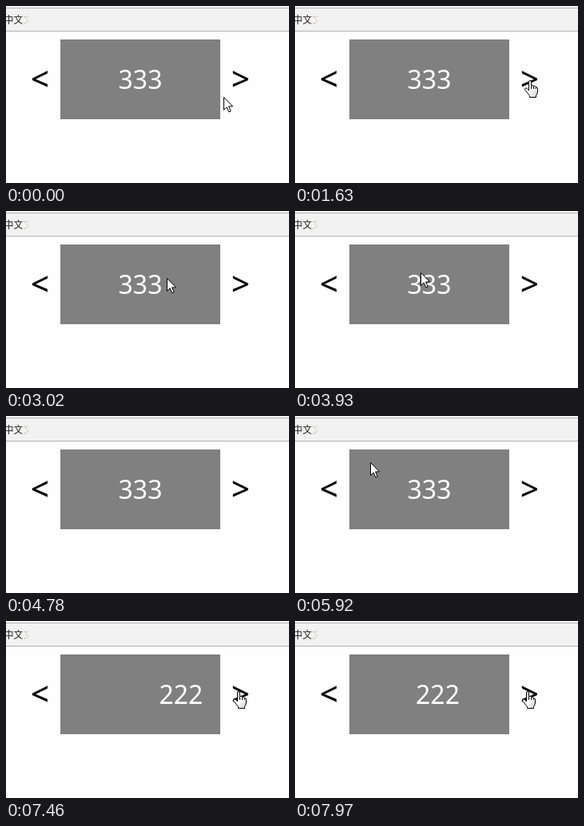
An HTML page for the animation above (8 s loop, 354 by 222 pixels).

```html
<!DOCTYPE html>
<html lang="en">
<head>
<meta charset="utf-8">
<title>Carousel</title>
<style>
  html, body { margin: 0; width: 100%; height: 100%; overflow: hidden; background: #fefefe; }
  svg { display: block; }
  .tab { font: 12px "Noto Sans CJK SC", "Noto Sans CJK", "Noto Sans", sans-serif; }
  .slide { font: 32px "Noto Sans", "Open Sans", sans-serif; fill: #fff; text-anchor: middle; }
  .nav { font: 40px "Open Sans", "Noto Sans", sans-serif; text-anchor: middle; stroke: #000; stroke-width: .4; }
  .cursor { fill: #fff; stroke: #000; stroke-linejoin: round; }
</style>
</head>
<body>
<svg width="354" height="222" viewBox="0 0 354 222">
  <defs>
    <linearGradient id="fade" gradientUnits="userSpaceOnUse" x1="19" x2="30">
      <stop stop-color="#222"/>
      <stop offset=".2" stop-color="#b5ad98"/>
      <stop offset="1" stop-color="#b5ad98" stop-opacity="0"/>
    </linearGradient>
    <linearGradient id="skin" x2="1" y2="1">
      <stop offset=".5" stop-color="#fff"/>
      <stop offset="1" stop-color="#ccc"/>
    </linearGradient>
    <clipPath id="view"><rect x="68" y="42" width="200" height="100"/></clipPath>
  </defs>

  <rect y="2" width="354" height="30" fill="#f2f2f2"/>
  <path d="M0 2.5H354M0 31.5H354" stroke="#b0b0b0"/>
  <text class="tab" x="-2.5" y="22" fill="url(#fade)">中文文</text>

  <rect x="68" y="42" width="200" height="100" fill="#808080"/>
  <g clip-path="url(#view)">
    <g id="strip" class="slide">
      <text x="168" y="104">111</text>
      <text x="368" y="104">222</text>
      <text x="568" y="104">333</text>
    </g>
  </g>

  <text class="nav" x="42.5" y="105.5">&lt;</text>
  <text class="nav" x="293.5" y="105.5">&gt;</text>

  <path id="arrow" class="cursor" d="M.5 .5v16l3.7-3.6 2.6 6 2.4-1-2.6-6h5z"/>
  <g id="hand" class="cursor">
    <path fill="url(#skin)" d="M5.5 13V2Q5.5 .5 7 .5T8.5 2V6.5Q11.5 5.7 11.5 7.5Q14 6.8 14.2 8.7Q16.5 8.3 16.5 10.8V14Q16.5 17 14.5 19.5V21.5H6.5V19.5L1 12.5Q0 11 1 10.2T3.5 10.7Z"/>
    <path d="M8.5 7v4M11.5 8v3M14.2 9v2" fill="none"/>
  </g>
</svg>
<script>
const LOOP = 8000, TICK = 129, WIDTH = 200;
const SLIDE = { shown: 6680, start: 6589, length: 1930 };
const AWAY = { from: 4780, to: 5770 };

// Pointer strokes: Bézier curves, one step along per tick
const strokes = [
  { at: 150, steps: 3, x: [272, 277, 284, 287], y: [114, 106, 96, 90] },
  { at: 1630, steps: 4, x: [287, 286, 289, 292], y: [90, 95, 96, 93] },
  { at: 2330, steps: 8, x: [292, 70, 152, 290], y: [93, 61, 82, 93] },
  { at: 3480, steps: 8, x: [290, 230, 80, 36], y: [93, 72, 74, 88] },
  { at: 5770, steps: 6, x: [36, -22, 370, 284], y: [88, 43, 43, 88] }
];

const [strip, arrow, hand] = ["strip", "arrow", "hand"].map(id => document.getElementById(id));

const bezier = ([a, b, c, d], p) => {
  const q = 1 - p;
  return q * q * q * a + 3 * q * q * p * b + 3 * q * p * p * c + p * p * p * d;
};

// Same curve as the CSS "ease" timing function
function ease(x) {
  let lo = 0, hi = 1;
  for (let i = 0; i < 24; i++) {
    const mid = (lo + hi) / 2;
    if (bezier([0, .25, .25, 1], mid) < x) lo = mid; else hi = mid;
  }
  return bezier([0, .1, 1, 1], lo);
}

function stripOffset(t) {
  if (t < SLIDE.shown) return -2 * WIDTH;
  const held = SLIDE.shown + Math.floor((t - SLIDE.shown) / TICK) * TICK;
  return -WIDTH * ease((held - SLIDE.start) / SLIDE.length);
}

function pointer(t) {
  const { at, steps, x, y } = strokes.findLast(s => s.at <= t) || strokes[0];
  const step = Math.floor((t - at) / TICK) + 1;
  const p = Math.min(Math.max(step, 0), steps) / steps;
  return [x, y].map(points => Math.round(bezier(points, p)));
}

function place(el, x, y, visible = true) {
  el.setAttribute("transform", `translate(${x} ${y})`);
  el.setAttribute("visibility", visible ? "visible" : "hidden");
}

function draw() {
  const t = performance.now() % LOOP;
  const [x, y] = pointer(t);
  const shown = t < AWAY.from || t >= AWAY.to;
  const overNav = x < 56 || x > 280;
  place(strip, stripOffset(t), 0);
  place(arrow, x, y, shown && !overNav);
  place(hand, x, y, shown && overNav);
  requestAnimationFrame(draw);
}
draw();
</script>
</body>
</html>
```
